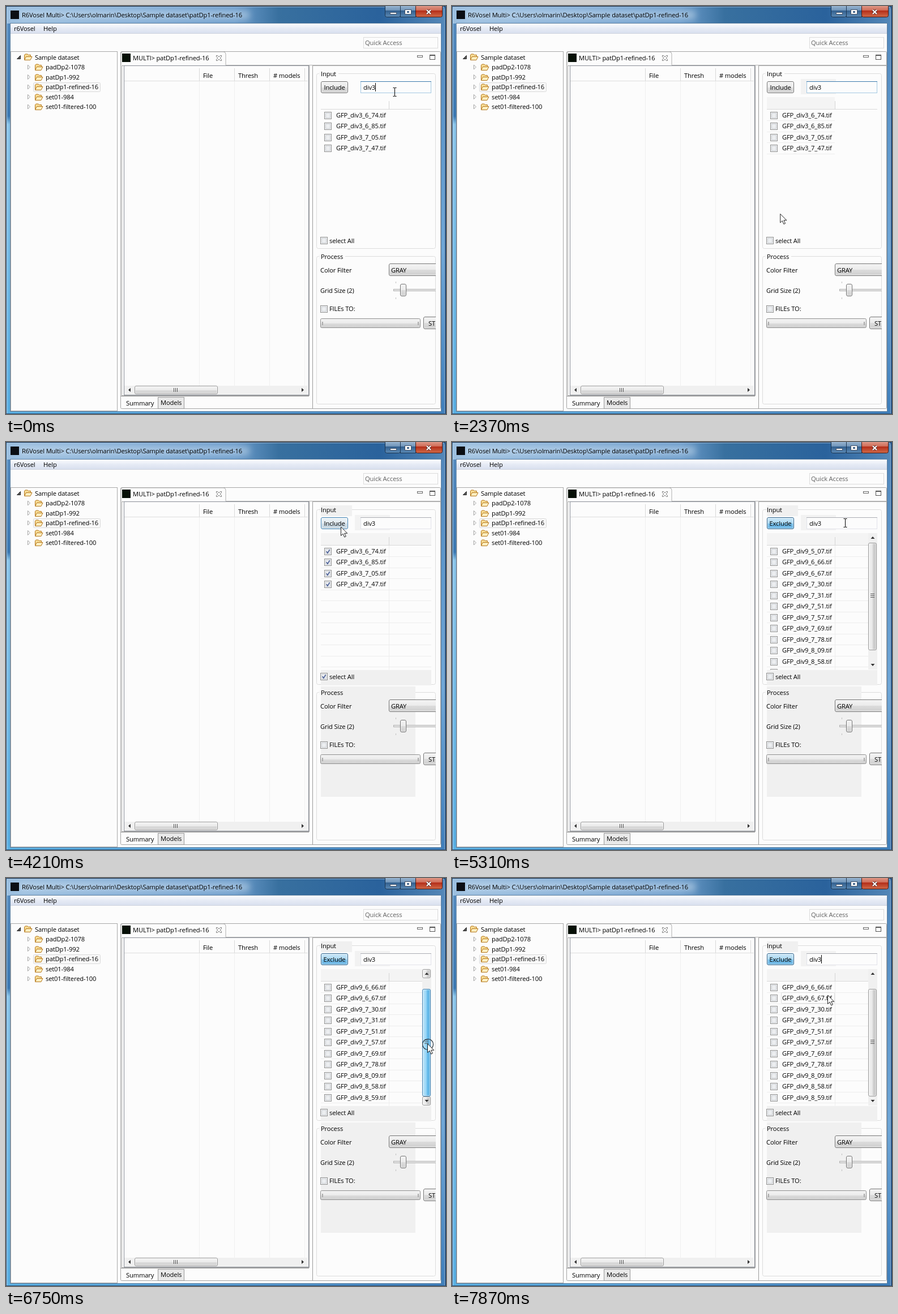
Write an HTML page that moves like this. It is 777x721 px and loops after 8000 ms.

```html
<!DOCTYPE html>
<html lang="en">
<head>
<meta charset="utf-8">
<title>File filter demo</title>
<style>
html, body { margin: 0; width: 100%; height: 100%; overflow: hidden; background: #fff; }
svg { display: block; width: 777px; height: 721px; }
text { font: 11.2px "Open Sans", "Noto Sans", sans-serif; letter-spacing: -.15px; fill: #000; white-space: pre; }
</style>
</head>
<body>
<svg id="stage" viewBox="0 0 777 721">
  <defs>
    <linearGradient id="title">
      <stop offset="0" stop-color="#9dc0e0"/><stop offset=".3" stop-color="#83add6"/>
      <stop offset=".52" stop-color="#6c9ccb"/><stop offset=".62" stop-color="#38709f"/>
      <stop offset=".85" stop-color="#2a629c"/><stop offset="1" stop-color="#5588b8"/>
    </linearGradient>
    <linearGradient id="left" x2="0" y2="1">
      <stop offset="0" stop-color="#5a8fc2"/><stop offset=".27" stop-color="#3b78b2"/>
      <stop offset=".29" stop-color="#8cc6ea"/><stop offset="1" stop-color="#58aee2"/>
    </linearGradient>
    <linearGradient id="right" x2="0" y2="1">
      <stop offset="0" stop-color="#4f84b8"/><stop offset=".3" stop-color="#5c96cb"/>
      <stop offset=".6" stop-color="#6fa6d6"/><stop offset="1" stop-color="#3d7dba"/>
    </linearGradient>
    <linearGradient id="bottom">
      <stop offset="0" stop-color="#5cb2e4"/><stop offset=".5" stop-color="#5b9fd4"/><stop offset="1" stop-color="#3f7fbb"/>
    </linearGradient>
    <linearGradient id="menu" x2="0" y2="1">
      <stop offset="0" stop-color="#fdfdff"/><stop offset=".5" stop-color="#e6ebf5"/><stop offset="1" stop-color="#d9e0ef"/>
    </linearGradient>
    <linearGradient id="btn" x2="0" y2="1">
      <stop offset="0" stop-color="#f3f3f3"/><stop offset=".5" stop-color="#ebebeb"/>
      <stop offset=".51" stop-color="#dcdcdc"/><stop offset="1" stop-color="#cfcfcf"/>
    </linearGradient>
    <linearGradient id="btnHot" x2="0" y2="1">
      <stop offset="0" stop-color="#eef4f8"/><stop offset=".5" stop-color="#e0e9ef"/>
      <stop offset=".51" stop-color="#d0dde6"/><stop offset="1" stop-color="#c3d4df"/>
    </linearGradient>
    <linearGradient id="btnOn" x2="0" y2="1">
      <stop offset="0" stop-color="#cfe9f8"/><stop offset=".5" stop-color="#a9d8f2"/>
      <stop offset=".51" stop-color="#79c0ea"/><stop offset="1" stop-color="#68b3e2"/>
    </linearGradient>
    <linearGradient id="headHot" x2="0" y2="1">
      <stop offset="0" stop-color="#e3f6fe"/><stop offset=".5" stop-color="#d5f1fd"/>
      <stop offset=".51" stop-color="#bce8fb"/><stop offset="1" stop-color="#b4e4f9"/>
    </linearGradient>
    <linearGradient id="barV">
      <stop offset="0" stop-color="#f4f4f4"/><stop offset=".5" stop-color="#e6e6e6"/>
      <stop offset=".51" stop-color="#d4d4d4"/><stop offset="1" stop-color="#c4c4c4"/>
    </linearGradient>
    <linearGradient id="barOn">
      <stop offset="0" stop-color="#c4e8fa"/><stop offset=".5" stop-color="#92d3f5"/>
      <stop offset=".51" stop-color="#6cc0ee"/><stop offset="1" stop-color="#5bb0e2"/>
    </linearGradient>
    <linearGradient id="glass" x2="0" y2="1">
      <stop offset="0" stop-color="#a5bfd8"/><stop offset=".48" stop-color="#6e93b8"/>
      <stop offset=".5" stop-color="#33608f"/><stop offset="1" stop-color="#5c8ab5"/>
    </linearGradient>
    <linearGradient id="close" x2="0" y2="1">
      <stop offset="0" stop-color="#e2a596"/><stop offset=".48" stop-color="#cf6a55"/>
      <stop offset=".5" stop-color="#b52f1a"/><stop offset="1" stop-color="#d06a48"/>
    </linearGradient>
    <filter id="blur" x="-20%" y="-100%" width="140%" height="300%"><feGaussianBlur stdDeviation="6"/></filter>
    <clipPath id="pane"><rect x="542" y="106" width="217" height="604"/></clipPath>
    <clipPath id="rows"><rect x="555" y="183" width="196" height="219.5"/></clipPath>
  </defs>
  <g id="frame"></g>
  <g id="panel" clip-path="url(#pane)"></g>
  <g id="pointer"></g>
</svg>
<script>
const LOOP = 8000;
const PAPER = '#fcfcfc';
const byId = id => document.getElementById(id);
const text = (x, y, s, extra = '') => `<text x="${x}" y="${y}" ${extra}>${s}</text>`;
const rect = (x, y, w, h, fill, extra = '') => `<rect x="${x}" y="${y}" width="${w}" height="${h}" fill="${fill}" ${extra}/>`;
const box = (x, y, w, h, fill, stroke, r = 0) => rect(x + .5, y + .5, w - 1, h - 1, fill, `stroke="${stroke}" rx="${r}"`);
const path = (d, stroke, fill = 'none', w = 1) => `<path d="${d}" stroke="${stroke}" fill="${fill}" stroke-width="${w}"/>`;
const hline = (x1, x2, y, c) => rect(x1, y, x2 - x1, 1, c);
const vline = (x, y1, y2, c) => rect(x, y1, 1, y2 - y1, c);
const button = (x, y, w, h, fill = 'url(#btn)', stroke = '#707070') =>
  box(x, y, w, h, fill, stroke, 2.5) + box(x + 1, y + 1, w - 2, h - 2, 'none', 'rgba(255,255,255,.6)', 1.5);

function checkBox(x, y, on) {
  return box(x, y, 13, 13, '#f6f6f6', '#8e8f8f') + box(x + 2, y + 2, 9, 9, '#eceef0', '#cbcfd5') +
    (on ? path(`M${x + 3.7} ${y + 6.2} l2.2 3 l3.6 -5.8`, '#4a5f97', 'none', 1.7) : '');
}

function folder(x, y) {
  return path(`M${x + 1.5} ${y + 10.5} v-8 l1.5 -1.5 h4 l1.5 1.5 h4 v3`, '#b5781e', '#f7dc95') +
    path(`M${x + 1.5} ${y + 11.5} l3 -6 h10.5 l-3 6 z`, '#b5781e', '#fdeec0');
}

function windowFrame() {
  let s = rect(0, 0, 400, 721, 'url(#left)') + rect(400, 0, 377, 721, 'url(#right)') + rect(0, 0, 777, 31, 'url(#title)') +
    rect(0, 713, 777, 8, 'url(#bottom)') + rect(22, 8, 408, 16, '#d3e3f1', 'opacity=".5" filter="url(#blur)"') +
    hline(0, 777, 0, '#0d2440') + hline(4, 773, 1, '#9dbddb') + vline(0, 0, 721, '#21456c') + vline(1, 4, 721, '#b5d8f0') +
    vline(775, 0, 721, '#1d4068') + vline(774, 4, 721, '#8fbbe2') + vline(776, 0, 721, '#2a5f98') + hline(0, 777, 720, '#284e76');
  s += rect(8, 8, 15, 15, '#0c0f14') +
    text(28, 19.5, 'R6Vosel Multi&gt; C:\\Users\\olmarin\\Desktop\\Sample dataset\\patDp1-refined-16');
  s += box(669, -3, 28, 23, 'url(#glass)', '#1c3550', 3) + box(696, -3, 28, 23, 'url(#glass)', '#1c3550') +
    box(723, -3, 48, 23, 'url(#close)', '#4b1a14', 3) +
    box(678, 11, 12, 4, '#fff', '#45546a') + box(704, 6, 12, 9, '#fff', '#45546a') + rect(708, 9, 4, 3, '#45658a') +
    path('M743 7 l7 7 m0 -7 l-7 7', '#5a2a2a', 'none', 4) + path('M743 7 l7 7 m0 -7 l-7 7', '#fff', 'none', 2.2);
  s += box(7, 30, 762, 687, PAPER, '#5d7f9f') + rect(8, 31, 760, 17, 'url(#menu)') + hline(8, 768, 48, '#cdd3de') +
    text(14, 43.5, 'r6Vosel') + text(66, 43.5, 'Help') +
    box(631, 55, 132, 20, PAPER, '#dcdcdc') + text(634, 69, 'Quick Access', 'style="fill:#606060"');
  return s;
}

function tree() {
  const names = ['padDp2-1078', 'patDp1-992', 'patDp1-refined-16', 'set01-984', 'set01-filtered-100'];
  let s = box(8, 80, 189, 636, PAPER, '#a9a9a9') + path('M25.5 87.5 v6 h-6 z', '#262626', '#595959') +
    folder(31, 84) + text(51, 94.5, 'Sample dataset') + box(48, 135, 119, 17, '#f8f8f8', '#dadada', 2);
  names.forEach((name, i) => {
    const y = 108 + i * 17.5;
    s += path(`M38.5 ${y - 4} l4 4 l-4 4 z`, '#a5a5a5', PAPER) + folder(50, Math.round(y - 6)) + text(70, Math.round(y + 4), name);
  });
  return s;
}

function modelTable() {
  let s = box(202, 80, 566, 632, PAPER, '#a5a5a5', 2) +
    path('M203 104.5 V84 q0 -3 3 -3 H384 q4 0 4 4 V104.5', '#b0b0b0', PAPER) + hline(388, 768, 104, '#b4b4b4') +
    rect(205, 84, 15, 15, '#071007') + text(224, 95.5, 'MULTI&gt; patDp1-refined-16') +
    path('M371.5 87.5 h2 l2.5 2.5 l2.5 -2.5 h2 v2 l-2.5 2.5 l2.5 2.5 v2 h-2 l-2.5 -2.5 l-2.5 2.5 h-2 v-2 l2.5 -2.5 l-2.5 -2.5 z', '#777', '#fff') +
    box(726, 87, 10, 4, '#fff', '#666') + box(748, 86, 10, 9, '#fff', '#555') + hline(748, 758, 87, '#555');
  s += box(204, 105, 332, 584, PAPER, '#a5a5a5') + box(208, 105, 327, 583, PAPER, '#8a8f98') + hline(209, 533, 132, '#dedede');
  for (const x of [341, 403, 465, 527]) s += vline(x, 110, 132, '#d8d8d8') + vline(x, 133, 671, '#f0f0f0');
  s += text(348, 126.5, 'File') + text(410, 126.5, 'Thresh') + text(472, 126.5, '# models');
  s += rect(209, 671, 324, 16, '#f0f0f0') + button(227, 671, 147, 15, 'url(#btn)', '#979797') +
    path('M220 675 v7 l-4 -3.5 z', 'none', '#333') + path('M522 675 v7 l4 -3.5 z', 'none', '#333');
  for (let x = 296; x < 304; x += 3) s += vline(x, 675, 682, '#555');
  s += hline(203, 535, 689, '#9a9a9a') + text(212, 706, 'Summary') +
    box(268, 691, 47, 21, '#e9e9e9', '#9a9a9a') + text(273, 705, 'Models') +
    vline(541, 105, 712, '#9b9b9b') + hline(541, 768, 105, '#a9a9a9');
  return s;
}

// Bursts of picture changes: [first, last, steps]
const bursts = [[0, 0, 1], [120, 120, 1], [400, 710, 3], [990, 1430, 4], [1710, 2640, 8], [2760, 3770, 8],
  [3900, 4630, 6], [5040, 5970, 8], [6090, 7060, 8], [7210, 7870, 6]];

function heldTime(t) {
  const [a, b, n] = bursts.filter(x => x[0] <= t).pop();
  if (n === 1 || t >= b) return b;
  const step = (b - a) / (n - 1);
  return a + Math.floor((t - a) / step) * step;
}

// Pointer hot spot: [time, x, y]
const route = [[0, 686, 152], [400, 686, 152], [710, 684, 151], [990, 681, 151], [1430, 660, 152], [1710, 648, 228],
  [2400, 560, 409], [2760, 560, 409], [3200, 590, 293], [3770, 596, 190], [4190, 592, 150], [5040, 592, 150],
  [5300, 694, 143], [5700, 694, 143], [5970, 745, 275], [6200, 745, 275], [6600, 745, 293], [6800, 745, 293],
  [7060, 742, 285], [7210, 738, 275], [7800, 664, 207]];

function pointerAt(t) {
  const i = route.findIndex(p => p[0] > t);
  if (i < 0) return route[route.length - 1].slice(1);
  const [a, x, y] = route[i - 1], [b, x2, y2] = route[i];
  const k = (t - a) / (b - a);
  return [x + (x2 - x) * k, y + (y2 - y) * k];
}

const CHECK = 2500, FILL = 2760, SWAP = 4480, CLICK = 5750, GRAB = 6200, DROP = 6780;
const early = ['3_6_74', '3_6_85', '3_7_05', '3_7_47'];
const late = ['5_07', '6_66', '6_67', '7_30', '7_31', '7_51', '7_57', '7_69', '7_78', '8_09', '8_58', '8_59'].map(n => '9_' + n);
const blinkOn = t => Math.floor(t / 530) % 2 === 0;
const within = (x, y, l, t, r, b) => x >= l && x < r && y >= t && y < b;

function fileList(t, px, py, drag) {
  const swapped = t >= SWAP, full = t >= FILL, right = swapped ? 735 : 751;
  const first = swapped && drag > .5 ? 1 : 0;
  const names = swapped ? late.slice(first) : early;
  let s = '';
  if (t >= 1700) s += rect(556, 161, (full ? right : 676) - 556, 21, '#f4f4f4');
  if (t >= 1700 && t < 1830) s += box(555, 160, 122, 22, 'url(#headHot)', '#93c9e3');
  s += hline(556, right, 182, '#d9d9d9') + vline(676, 168, 182, '#d5d5d5');
  s += '<g clip-path="url(#rows)">';
  if (full) s += rect(556, 183, right - 556, 220, PAPER) + vline(676, 183, 403, '#ededed');
  if (t >= 1700) for (let i = 1; i <= (full ? 11 : 4); i++) s += hline(556, full ? right : 676, Math.round(183 + i * 19.45), '#ededed');
  names.forEach((name, i) => {
    const y = 193 + i * 19.45, top = Math.round(y - 10);
    if (t >= 1700 && within(px, py, 581, top, 676, top + 19)) s += box(581, top, 95, 20, '#fdfdfd', '#dcdcdc', 2);
    s += checkBox(562, Math.round(y - 6), full && !swapped) + text(583, Math.round(y + 4), `GFP_div${name}.tif`);
  });
  s += '</g>';
  if (swapped) {
    const y = Math.round(178 + 17.5 * drag), hot = t >= 5900 && t < 7060;
    s += rect(735, 161, 16, 241, '#f0f0f0');
    if (hot) s += button(735, 161, 15, 16, 'url(#barV)', '#999') + button(735, 386, 15, 16, 'url(#barV)', '#999');
    s += path('M739.5 171 h7 l-3.5 -4 z', 'none', '#333') + path('M739.5 392 h7 l-3.5 4 z', 'none', '#333') +
      button(735, y, 15, 190, hot ? 'url(#barOn)' : 'url(#barV)', hot ? '#3c7fb1' : '#979797');
    for (let i = 0; i < 3; i++) s += hline(739, 746, y + 90 + i * 3, '#555');
  }
  return s;
}

function inputGroup(t, px, py, drag) {
  const swapped = t >= SWAP, focused = t < CHECK;
  const caret = focused ? blinkOn(t + 410) : t >= CLICK && blinkOn(t - CLICK);
  const hot = within(px, py, 556, 133, 604, 154);
  const face = swapped ? ['url(#btnOn)', '#2c628b'] : hot ? ['url(#btnHot)', '#3c7fb1'] : [];
  let s = box(548, 119, 211, 310, 'none', '#dcdcdc', 3);
  s += t < 3900 ? rect(553, 112, 34, 14, PAPER) : rect(556, 112, 55, 19, '#f0f0f0');
  s += text(556, 123.5, 'Input');
  if (t >= 1400) s += rect(616, 129, 62, 27, '#f2f2f2');
  if (t >= FILL) s += rect(556, 403, 195, 27, '#f0f0f0');
  s += button(556, 133, 48, 21, ...face) + text(580, 147.5, swapped ? 'Exclude' : 'Include', 'text-anchor="middle"') +
    box(626, 133, 125, 21, PAPER, focused ? '#a4c9e3' : '#e2e3ea') + hline(626, 751, 133, focused ? '#3d7bad' : '#abadb3') +
    text(631, 147.5, 'div3') + (caret ? vline(652, 136, 151, '#000') : '');
  s += fileList(t, px, py, drag) + checkBox(555, 408, t >= CHECK && !swapped) + text(571, 418.5, 'select All');
  return s;
}

function processGroup(t) {
  let s = box(548, 442, 211, 262, 'none', '#dcdcdc', 3) + rect(553, 436, 46, 14, PAPER);
  if (t >= 3600) s += rect(556, 432, 167, 195, '#f0f0f0');
  s += text(556, 446.5, 'Process') + text(555, 470.5, 'Color Filter') + button(676, 455, 100, 22) + text(680, 470.5, 'GRAY') +
    text(555, 506.5, 'Grid Size (2)') + box(684, 500, 90, 4, '#e7e7e7', '#b0b0b0') +
    vline(688, 487, 490, '#c0c0c0') + vline(688, 515, 518, '#c0c0c0') + button(696, 491, 11, 22) +
    checkBox(555, 529, false) + text(571, 539, 'FILEs TO:') +
    box(555, 552, 177, 17, 'url(#btn)', '#8f8f8f', 2) + rect(558, 558, 2, 6, '#aaa') + rect(727, 558, 2, 6, '#aaa') +
    button(737, 549, 60, 22) + text(746, 564.5, 'ST');
  return s;
}

function pointer(t, x, y) {
  const beam = t < 1700 || within(x, y, 626, 134, 751, 153);
  if (beam) {
    x = Math.round(x) + .5; y = Math.round(y);
    return path(`M${x - 3} ${y - 7.5} h2.5 l.5 1 l.5 -1 h2.5 M${x} ${y - 7} v14 M${x - 3} ${y + 7.5} h2.5 l.5 -1 l.5 1 h2.5`, '#000');
  }
  const ring = t >= GRAB && t < DROP ? `<circle cx="${x}" cy="${y + 1}" r="9.5" fill="none" stroke="#26343f" stroke-width="1.2"/>` : '';
  return ring + path(`M${x - .5} ${y} v15.5 l3.6 -3.4 l2.6 6 l2.6 -1.2 l-2.6 -5.6 h5 z`, '#222', '#fff');
}

byId('frame').innerHTML = windowFrame() + tree() + modelTable();

let shown = -1;
function draw(now) {
  const t = heldTime(now % LOOP);
  if (t !== shown) {
    shown = t;
    const [x, y] = pointerAt(t);
    const drag = Math.min(1, Math.max(0, (t - GRAB) / 400));
    byId('panel').innerHTML = inputGroup(t, x, y, drag) + processGroup(t);
    byId('pointer').innerHTML = pointer(t, x, y);
  }
}

const start = performance.now();
function tick() {
  draw(performance.now() - start);
  requestAnimationFrame(tick);
}
tick();
</script>
</body>
</html>
```
